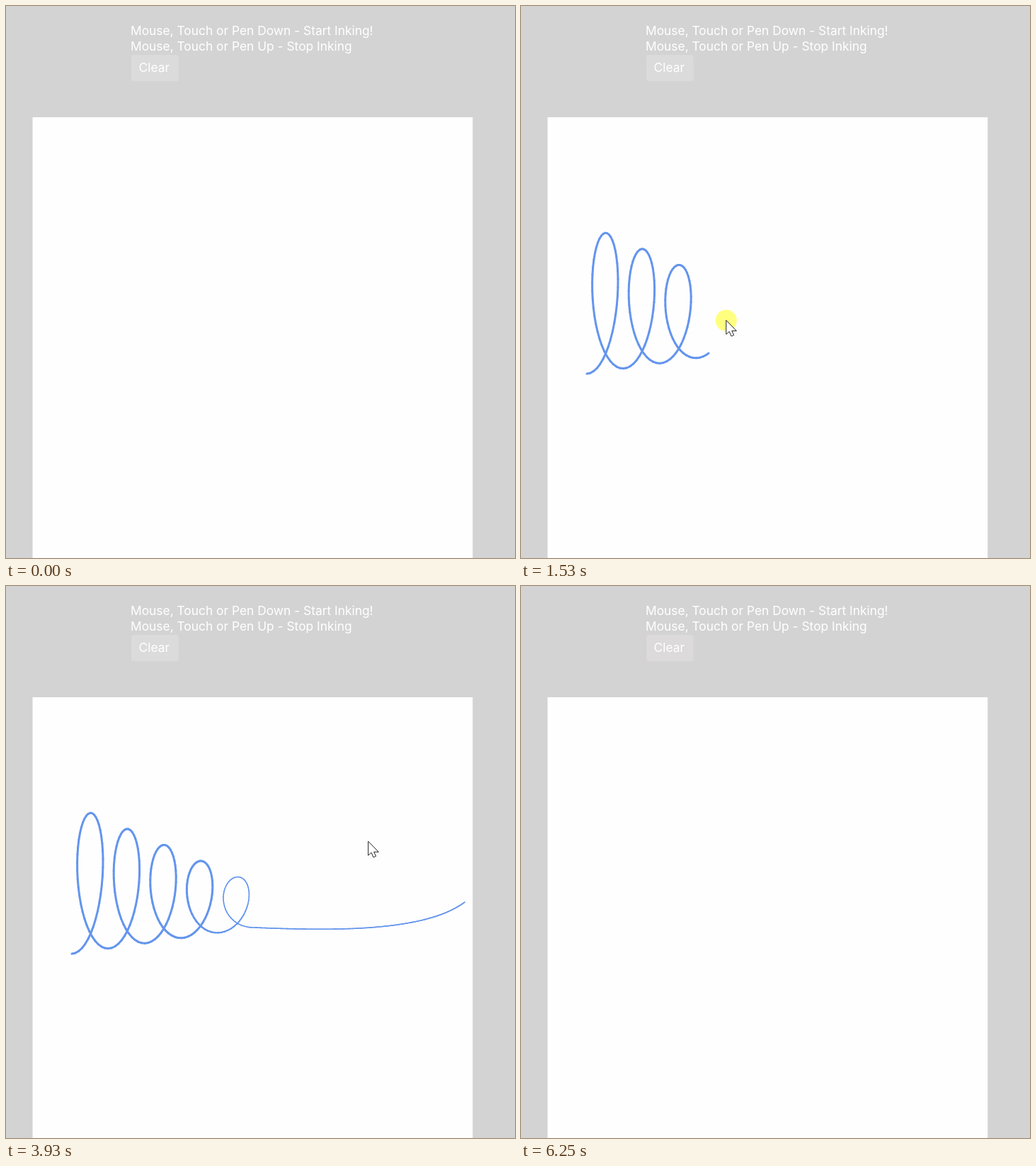
These frames come from a looping animation (719 by 779 pixels, 6450 ms). An HTML page with a canvas:

```html
<!DOCTYPE html>
<html lang="en">
<head>
<meta charset="utf-8">
<title>Inking demo</title>
<style>
  html, body { margin: 0; width: 100%; height: 100%; overflow: hidden; background: #d3d3d3; }
  svg, canvas { position: absolute; left: 0; top: 0; width: 719px; height: 779px; }
  text { font: 17.38px Inter, "Open Sans", sans-serif; fill: #fff; }
</style>
</head>
<body>
<svg viewBox="0 0 719 779">
  <rect x="37.5" y="157" width="621.7" height="630" fill="#fefefe"/>
  <rect id="button" x="177" y="69" width="66.7" height="37.3" rx="3.75" fill="#dbdbdb"/>
  <text x="176" y="41.3">Mouse, Touch or Pen Down - Start Inking!</text>
  <text x="176" y="63">Mouse, Touch or Pen Up - Stop Inking</text>
  <text x="187.5" y="93">Clear</text>
</svg>
<canvas id="stage" width="719" height="779"></canvas>
<script>
const LOOP = 6450, STEP = 66.5, LAG = 60;
const PEN_DOWN = 725, PEN_UP = 2735, CLICK = 5380, CLEAR = 5440;
const ctx = document.getElementById('stage').getContext('2d');
const button = document.getElementById('button');
const arrow = new Path2D('M0 0V19.5L4.4 15.6L7.3 22.2L10.9 20.6L8 14.6H14.2Z');

const clamp = f => Math.min(1, Math.max(0, f));
const easeIn = f => f * f;
const easeOut = f => 1 - (1 - f) ** 2;

function bezier(points, v) {
  const w = 1 - v;
  const weights = [w ** 3, 3 * w * w * v, 3 * w * v * v, v ** 3];
  return [0, 1].map(axis => weights.reduce((sum, k, i) => sum + k * points[i][axis], 0));
}

// Cursor moves with the pen up; it rests between them.
const moves = [
  { from: 70, to: 730, ease: easeOut, path: [[575, 746], [450, 620], [200, 508], [93, 519]] },
  { from: 2735, to: 3460, ease: easeOut, path: [[648, 446], [760, 310], [600, 300], [512, 357]] },
  { from: 3860, to: 4590, ease: easeIn, path: [[512, 357], [500, 520], [250, 640], [320, 745]] },
  { from: 4590, to: 5387, ease: easeOut, path: [[320, 745], [370, 790], [297, 181], [222, 90]] },
  { from: 5454, to: 6200, ease: easeOut, path: [[222, 90], [240, 250], [280, 578], [657, 779]] }
];
const tail = [[351, 482], [450, 486], [590, 490], [648, 446]];

// Pen progress: 0..1 runs along the coil, 1..2 along the closing line.
function penProgress(t) {
  const part = (from, to) => clamp((t - from) / (to - from));
  return 0.4 * easeOut(part(730, 1070)) + 0.5 * part(1070, 2000)
    + 0.1 * part(2000, 2593) + easeOut(part(2593, 2728));
}

function inkPoint(u) {
  if (u > 1) return bezier(tail, u - 1);
  const phase = 10 * Math.PI * u;
  return [
    93 + 258 * u + 30 * Math.sin(phase),
    519 - 37 * u - (105 - 75 * u) * (1 - Math.cos(phase))
  ];
}

function drawInk(end) {
  const du = 0.004;
  ctx.strokeStyle = '#6495ed';
  ctx.lineCap = 'round';
  for (let u = 0; u < end; u += du) {
    ctx.lineWidth = 3 - 1.4 * clamp((u - 0.75) * 10);
    ctx.beginPath();
    ctx.moveTo(...inkPoint(u));
    ctx.lineTo(...inkPoint(Math.min(end, u + du)));
    ctx.stroke();
  }
}

function cursorAt(t) {
  if (t > PEN_DOWN && t < PEN_UP) return inkPoint(penProgress(t));
  const move = moves.filter(m => t >= m.from).pop() || moves[0];
  return bezier(move.path, move.ease(clamp((t - move.from) / (move.to - move.from))));
}

function drawCursor([x, y], pressed) {
  ctx.save();
  ctx.translate(x, y);
  if (pressed) {
    ctx.fillStyle = 'rgba(255,255,0,.5)';
    ctx.beginPath();
    ctx.arc(0, 0, 15, 0, 2 * Math.PI);
    ctx.fill();
  }
  ctx.lineWidth = 1;
  ctx.fillStyle = '#fff';
  ctx.strokeStyle = '#222';
  ctx.fill(arrow);
  ctx.stroke(arrow);
  ctx.restore();
}

function render(time) {
  const step = Math.floor((time % LOOP + 8) / STEP);
  const t = step * STEP;
  ctx.clearRect(0, 0, 719, 779);
  if (t > PEN_DOWN && t < CLEAR) drawInk(penProgress(t - LAG));
  if (step >= 1 && step < 94) {
    const inking = t > PEN_DOWN && t < PEN_UP;
    const clicking = t > CLICK && t < CLEAR + STEP;
    drawCursor(cursorAt(t), inking || clicking);
  }
  button.setAttribute('fill', t > CLICK ? '#dcdadb' : '#dbdbdb');
}

const start = performance.now();
function tick() {
  render(performance.now() - start);
  requestAnimationFrame(tick);
}
tick();
</script>
</body>
</html>
```
